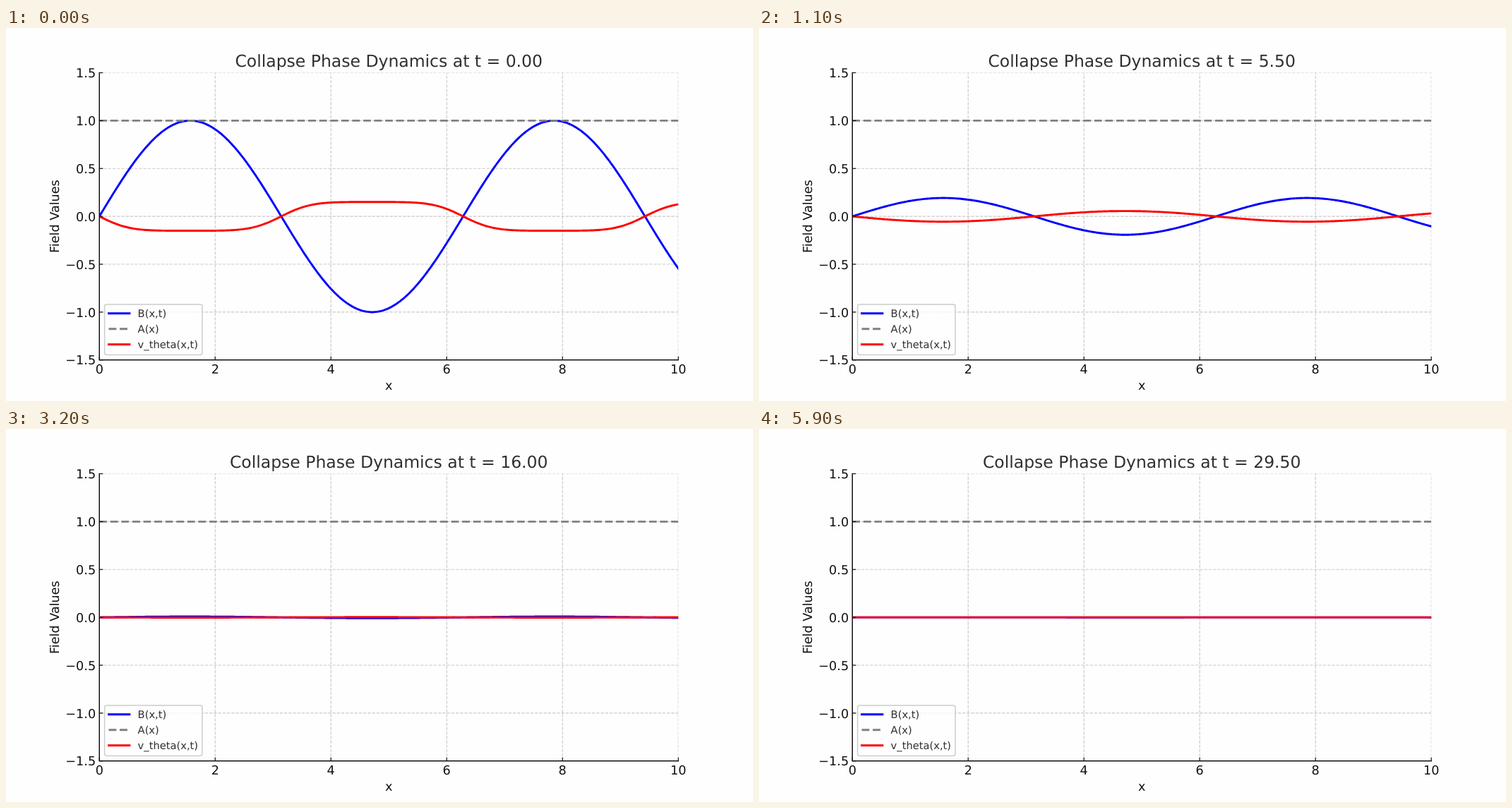
Recreate the animation shown at these times as an HTML page. Size 1058 by 529 pixels, loop 6 s.

```html
<!DOCTYPE html>
<html lang="en">
<head>
<meta charset="utf-8">
<title>Collapse Phase Dynamics</title>
<style>
  html, body { margin: 0; width: 100%; height: 100%; overflow: hidden; background: #fefefe; }
  svg { display: block; width: 100vw; height: 100vh; }
  text { font: 17.63px "DejaVu Sans", sans-serif; fill: #111; text-rendering: geometricPrecision; }
  path, line { fill: none; }
  .mid { text-anchor: middle; }
  .end { text-anchor: end; }
  #title { font-size: 23.51px; fill: #303030; }
  .key text { font-size: 14.69px; fill: #303030; }
  .key rect { fill: #fefefe; fill-opacity: .8; stroke: #ccc; stroke-width: 1.47; }
  .grid line { stroke: #c9c9c9; stroke-width: 1.18; stroke-dasharray: 4.35 1.88; }
  .tick { stroke: #111; stroke-width: 1.18; }
  .spine { stroke: #111; stroke-width: 1.5; stroke-linecap: square; }
  .curve { stroke-width: 2.94; stroke-linecap: square; stroke-linejoin: round; }
  .blue { stroke: #00f; }
  .red { stroke: #f00; }
  .gray { stroke: #808080; stroke-linecap: butt; stroke-dasharray: 10.87 4.7; }
</style>
</head>
<body>
<svg viewBox="0 0 1058 529">
  <clipPath id="plot"><rect x="132.25" y="63.48" width="819.95" height="407.33"/></clipPath>
  <g clip-path="url(#plot)">
    <g class="grid" id="grid"></g>
    <path class="curve blue" id="field"/>
    <path class="curve gray" d="M132.25 131.37H952.2"/>
    <path class="curve red" id="speed"/>
  </g>
  <g id="ticks"></g>
  <path class="spine" d="M132.25 63.48V470.81H952.2"/>
  <text class="mid" x="542.2" y="512.5">x</text>
  <text class="mid" transform="translate(74.8 267.15) rotate(-90)">Field Values</text>
  <text class="mid" id="title" x="542.2" y="54.5"></text>
  <g class="key">
    <rect x="139.6" y="391.9" width="138.4" height="71.5" rx="2.94"/>
    <path class="curve blue" d="M145.5 404.8h29.4"/>
    <path class="curve gray" d="M145.5 426.7h29.4"/>
    <path class="curve red" d="M145.5 448.7h29.4"/>
    <text x="186.6" y="410">B(x,t)</text>
    <text x="186.6" y="431.9">A(x)</text>
    <text x="186.6" y="453.9">v_theta(x,t)</text>
  </g>
</svg>
<script>
const LEFT = 132.25, RIGHT = 952.2, TOP = 63.48, BOTTOM = 470.81;
const px = x => LEFT + x * (RIGHT - LEFT) / 10;
const py = y => (TOP + BOTTOM) / 2 - y * (BOTTOM - TOP) / 3;
const get = id => document.getElementById(id);

function add(parent, name, attrs, label) {
  const el = document.createElementNS("http://www.w3.org/2000/svg", name);
  for (const key in attrs) el.setAttribute(key, attrs[key]);
  if (label) el.textContent = label;
  get(parent).append(el);
}

for (let x = 0; x <= 10; x += 2) {
  const at = px(x);
  add("grid", "line", { x1: at, x2: at, y1: BOTTOM, y2: TOP });
  add("ticks", "line", { class: "tick", x1: at, x2: at, y1: BOTTOM, y2: BOTTOM - 5.14 });
  add("ticks", "text", { class: "mid", x: at, y: 489.6 }, String(x));
}
for (let y = -1.5; y <= 1.5; y += 0.5) {
  const at = py(y);
  add("grid", "line", { x1: LEFT, x2: RIGHT, y1: at, y2: at });
  add("ticks", "line", { class: "tick", x1: LEFT, x2: LEFT + 5.14, y1: at, y2: at });
  add("ticks", "text", { class: "end", x: 127.1, y: at + 6.6 }, y.toFixed(1).replace("-", "\u2212"));
}

function curve(fn) {
  let d = "";
  for (let i = 0; i <= 400; i++) {
    const x = i / 40;
    d += (i ? "L" : "M") + px(x).toFixed(2) + " " + py(fn(x)).toFixed(2);
  }
  return d;
}

// B decays exponentially; v_theta is the rate of change of atan(B / A) with A = 1
let shown = -1;
function draw(now) {
  const step = Math.floor(now / 100) % 60;
  if (step !== shown) {
    shown = step;
    const t = step / 2;
    const b = x => Math.sin(x) * Math.exp(-0.3 * t);
    get("field").setAttribute("d", curve(b));
    get("speed").setAttribute("d", curve(x => -0.3 * b(x) / (1 + b(x) ** 2)));
    get("title").textContent = "Collapse Phase Dynamics at t = " + t.toFixed(2);
  }
  requestAnimationFrame(draw);
}
draw(0);
</script>
</body>
</html>
```
